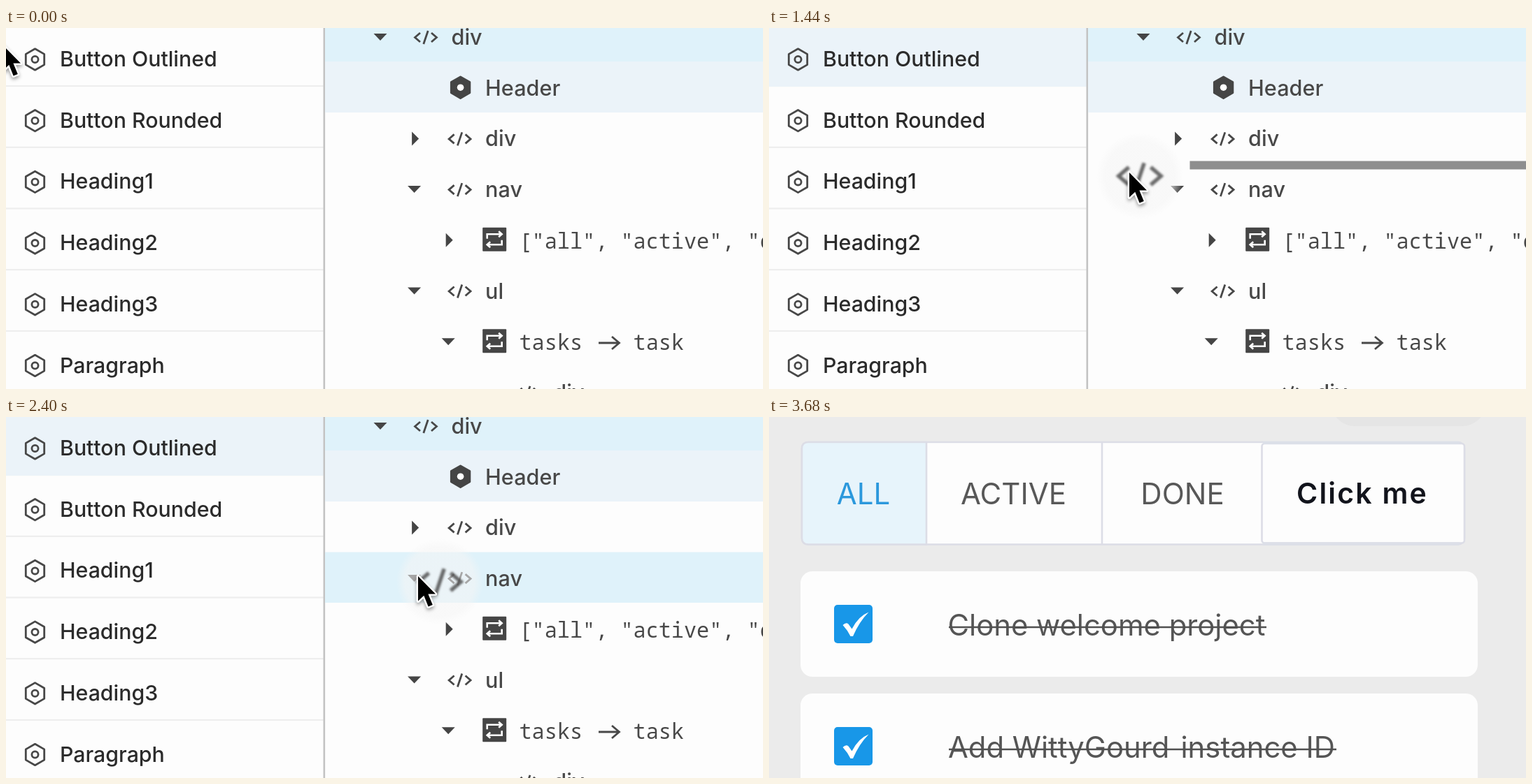
Recreate the animation shown at these times as an HTML page. Size 1082 by 517 pixels, loop 3760 ms.

```html
<!DOCTYPE html>
<html lang="en">
<head>
<meta charset="utf-8">
<title>Drag a component into the tree</title>
<style>
  html, body { margin: 0; width: 100%; height: 100%; overflow: hidden; background: #fdfdfd; }
  svg { display: block; width: 1082px; height: 517px; }
  text { font-family: Inter, "Open Sans", sans-serif; font-optical-sizing: none; white-space: pre; }
  .item { font-size: 30.3px; font-weight: 500; fill: #2b2b2b; }
  .node { font-size: 30.6px; font-weight: 500; fill: #484848; }
  .code { font-family: "Noto Sans Mono", "DejaVu Sans Mono", monospace; font-size: 30.2px; fill: #484848; }
  .line { fill: none; stroke: #484848; stroke-width: 2.8; }
  .dark { fill: #454545; }
  .tab { font-size: 42px; fill: #585858; text-anchor: middle; }
  .task { font-size: 41.8px; fill: #555; }
  .cta { font-size: 41px; font-weight: 600; letter-spacing: 2.2px; fill: #12141c; }
</style>
</head>
<body>
<svg viewBox="0 0 1082 517">
  <defs>
    <filter id="shade" x="-50%" y="-50%" width="200%" height="200%">
      <feDropShadow dx="0" dy="3" stdDeviation="2.5" flood-color="#000" flood-opacity=".38"/>
    </filter>
    <filter id="soft" x="-30%" y="-30%" width="160%" height="160%"><feGaussianBlur stdDeviation=".7"/></filter>
    <radialGradient id="halo">
      <stop offset=".8" stop-color="#f5f5f5" stop-opacity=".55"/>
      <stop offset="1" stop-color="#f5f5f5" stop-opacity="0"/>
    </radialGradient>
    <path id="hex" d="M0-15.2 13.2-7.6V7.6L0 15.2-13.2 7.6V-7.6Z" stroke-linejoin="round"/>
    <path id="tag" class="line" d="M-8-6.5-15.5 0-8 6.5M3.2-9.5-3.2 9.5M8-6.5 15.5 0 8 6.5"/>
    <path id="open" class="dark" d="M-9.5-5H9.5L0 5Z"/>
    <path id="shut" class="dark" d="M-5-10 5 0-5 10Z"/>
    <g id="loop">
      <rect class="dark" x="-17" y="-17" width="34" height="34" rx="1"/>
      <path d="M-10.5-1V-7.5H10M6-11.5 10.5-7.5 6-3.5M10.5 1V7.5H-10M-6 3.5-10.5 7.5-6 11.5" fill="none" stroke="#fff" stroke-width="2.6"/>
    </g>
  </defs>

  <g id="editor">
    <rect width="1082" height="517" fill="#fdfdfd"/>
    <g id="list"></g>
    <g id="tree"></g>
    <rect id="slot" x="601.5" y="190.5" width="481" height="12" fill="#8e8e8e"/>
    <g id="ghost">
      <circle r="62" fill="url(#halo)"/>
      <use href="#tag" transform="scale(1.95)" opacity=".82" filter="url(#soft)"/>
    </g>
    <path id="cursor" filter="url(#shade)" d="M1 2V37.5L9.3 29.8 15.6 45.5 21.8 43 15.4 27.6H26Z"
      fill="#000" stroke="#fff" stroke-width="4.5" stroke-linejoin="round" paint-order="stroke"/>
  </g>

  <g id="preview">
    <rect width="1082" height="517" fill="#ebebeb"/>
    <rect x="803" y="-60" width="222" height="73" rx="34" fill="#e5e5e5"/>
    <g id="tabs"></g>
    <g id="tasks"></g>
  </g>
</svg>
<script>
const $ = id => document.getElementById(id);
const use = (id, x, y, more = "") => `<use href="#${id}" x="${x}" y="${y}" ${more}/>`;
const label = (cls, x, y, s, more = "") => `<text class="${cls}" x="${x}" y="${y}" ${more}>${s}</text>`;
const box = (x, y, w, h, fill, more = "") =>
  `<rect x="${x}" y="${y}" width="${w}" height="${h}" fill="${fill}" ${more}/>`;

// Component list
const items = ["Button Outlined", "Button Rounded", "Heading1", "Heading2", "Heading3", "Paragraph"];
const itemStep = 87.7;
$("list").innerHTML =
  items.map((_, i) => box(0, 82 + i * itemStep, 454, 2.2, "#eeeeee")).join("") +
  box(0, 0, 454, 84, "#ebf3f9", 'id="hover"') +
  items.map((name, i) => {
    const y = 45 + i * itemStep;
    return use("hex", 41.5, y, 'class="line"') +
      `<circle class="line" cx="41.5" cy="${y}" r="4.6"/>` + label("item", 77, y + 10, name);
  }).join("") +
  box(453.5, 0, 2.6, 517, "#c3c3c3");

// Element tree: depth, arrow, icon, label
const rows = [
  [0, "open", "tag", "div"],
  [1, "", "comp", "Header"],
  [1, "shut", "tag", "div"],
  [1, "open", "tag", "nav"],
  [2, "shut", "loop", '["all", "active", "done"]'],
  [1, "open", "tag", "ul"],
  [2, "open", "loop", "tasks    task"],
  [3, "", "tag", "div"]
];
const rowStep = 72.7;
$("tree").innerHTML =
  box(456, 0, 626, 48, "#dff2fa") + box(456, 48, 626, 73, "#ebf3f9") +
  box(456, 193.5, 626, 72.5, "#dff2fa", 'id="target"') +
  rows.map(([depth, arrow, icon, name], i) => {
    const dx = depth * 48.6, y = 13.5 + i * rowStep, x = 600 + dx;
    let out = arrow ? use(arrow, 535 + dx + (arrow === "shut" ? 1.5 : 0), y - .5) : "";
    if (icon === "comp")
      out += use("hex", x + 1, y - 1, 'class="dark" stroke="#454545" stroke-width="3"') +
        `<circle cx="${x + 1}" cy="${y - 1}" r="4.8" fill="#fff"/>`;
    else out += use(icon, x + (icon === "loop" ? 1 : 0), y - (icon === "loop" ? 1.5 : 0));
    return out + (icon === "loop"
      ? label("code", 733.5, y + 11.5, name)
      : label("node", 636.5 + dx, y + 10.5, name));
  }).join("") +
  '<path class="line" d="M847 451H876M866 442 876.5 451 866 460"/>';

// Preview: tab bar and task cards
function drawTabs(grown) {
  const h = grown ? 146.5 : 116.5, right = grown ? 994 : 704;
  const base = grown ? 124.5 : 109.5;
  const edge = 'stroke="#dcdde6" stroke-width="2.6"';
  return box(47, 36, right - 47, h, "#fdfdfd", `rx="9" ${edge}`) +
    `<path d="M225 36H56Q47 36 47 45V${27 + h}Q47 ${36 + h} 56 ${36 + h}H225Z" fill="#e7f4fb" ${edge}/>` +
    `<path d="M476 36V${36 + h}" ${edge}/>` +
    label("tab", 135, base, "ALL", 'style="fill:#2b98dc"') +
    label("tab", 349.5, base, "ACTIVE") + label("tab", 591, base, "DONE") +
    (grown
      ? box(704.5, 38, 289.5, 142.5, "#fdfdfd", `rx="4" ${edge}`) +
        `<path d="M706 37H987M706 181.5H987" stroke="#dcdfe8" stroke-width="4"/>` +
        label("cta", 754, 124, "Click me")
      : "");
}
function drawTask(y, words, end) {
  return `<g transform="translate(0 ${y})">` +
    box(45, 0, 968, 151, "#fdfdfd", 'rx="17"') +
    box(93, 48, 55, 55, "#1897e8", 'rx="5"') +
    '<path d="M105.5 77Q110 72.500 113.500 75.500L118.500 82.500Q128 64 142.500 58.500Q129 72 120 93H116.500Q112 84 105.500 77Z" fill="#fff"/>' +
    words.map(([x, s]) => label("task", x, 91.5, s)).join("") +
    `<path d="M257 80H${end}" stroke="#505050" stroke-width="2.4"/></g>`;
}
$("tabs").innerHTML = `<g id="small">${drawTabs(false)}</g><g id="large">${drawTabs(true)}</g>`;
$("tasks").innerHTML =
  drawTask(191, [[255.500, "Clone welcome project"]], 711) +
  drawTask(366, [[256, "Add WittyGourd"], [588.500, "instance ID"]], 811);

// Motion: [ms, x, y]
const cursorPath = [
  [0, -5, 23], [80, -3, 22], [160, 3, 20], [320, 8, 17], [800, 62, 15], [960, 78, 16], [1120, 80, 16],
  [1200, 140, 22], [1280, 310, 42], [1360, 458, 80], [1440, 514, 205],
  [1600, 545, 213], [1840, 577, 225], [2000, 584, 228], [2400, 588, 226]
];
const ghostShift = [[1200, 16, 7], [1440, 16, 7], [2000, 32, 10]];
const LOOP = 3760, TICK = 80;

function along(path, t) {
  const last = path[path.length - 1];
  if (t >= last[0]) return last.slice(1);
  const i = Math.max(1, path.findIndex(p => p[0] > t));
  const a = path[i - 1], b = path[i];
  const k = Math.max(0, (t - a[0]) / (b[0] - a[0]));
  return [a[1] + (b[1] - a[1]) * k, a[2] + (b[2] - a[2]) * k];
}
const show = (id, on) => $(id).setAttribute("display", on ? "inline" : "none");
const move = (id, x, y) => $(id).setAttribute("transform", `translate(${x} ${y})`);

function draw(t) {
  const [x, y] = along(cursorPath, t), [gx, gy] = along(ghostShift, t);
  move("cursor", x, y);
  move("ghost", x + gx, y + gy);
  show("ghost", t >= 1200);
  show("hover", t >= 160);
  show("slot", t >= 1440 && t < 1760);
  show("target", t >= 1760);

  const grown = t >= 3520;
  show("editor", t < 2560);
  show("preview", t >= 2560);
  show("small", !grown);
  show("large", grown);
  move("tasks", 0, grown ? 30 : 0);
}

const start = performance.now();
function frame() {
  const t = (performance.now() - start) % LOOP;
  draw(Math.floor(t / TICK) * TICK);
  requestAnimationFrame(frame);
}
frame();
</script>
</body>
</html>
```
